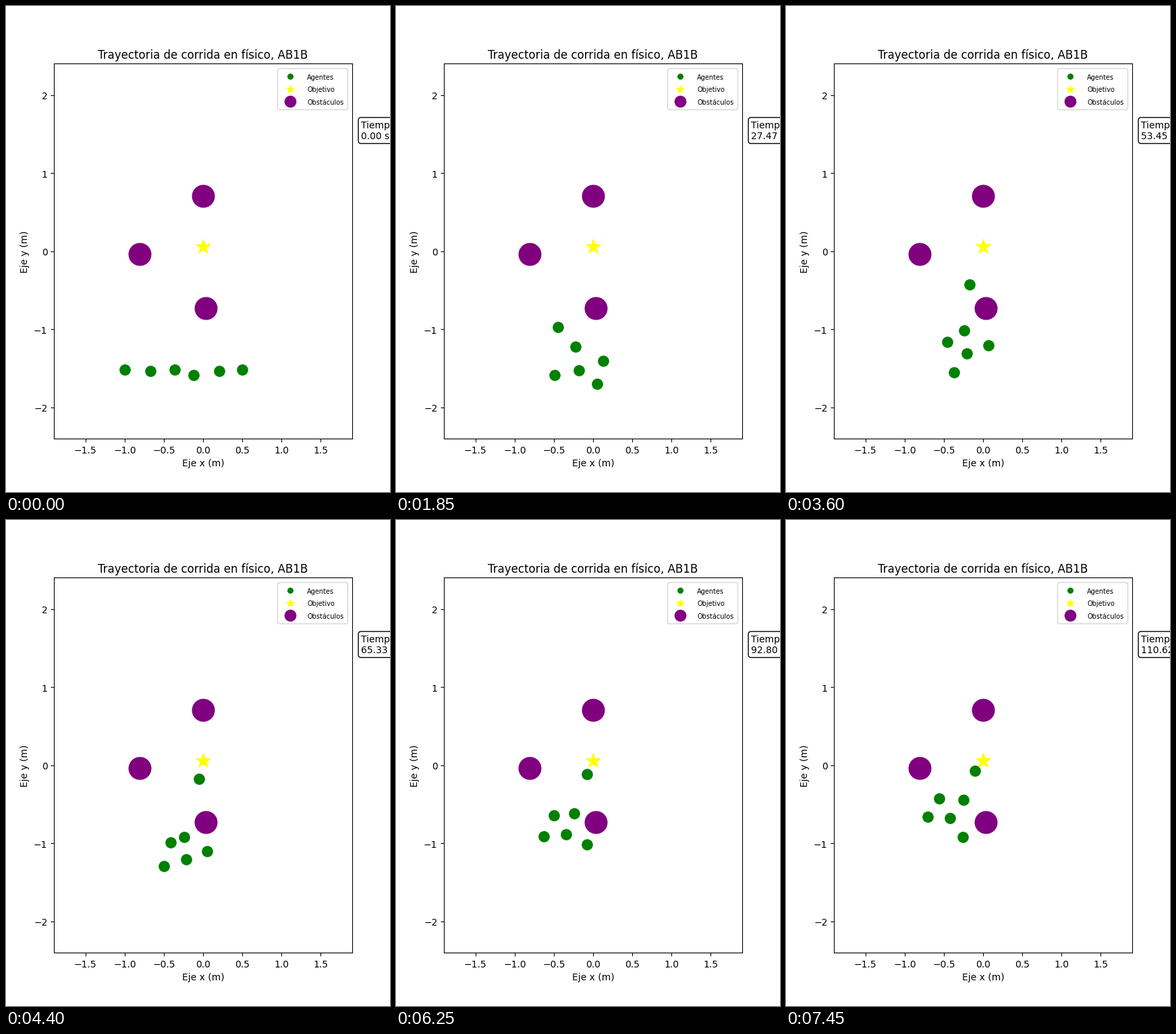
These frames come from a looping animation (569 px wide and 719 px high, 7.5 s). A matplotlib script:

```python
import numpy as np
import matplotlib.pyplot as plt
from matplotlib.animation import FuncAnimation

FRAMES, STEP_MS = 150, 50
SECONDS_PER_FRAME = 0.7424
RING, GATHER = 0.29, 14  # final ring radius (m), closing time (frames)

# Shared key times; the leader and the swarm centre move between key points (m)
KEYS = [0, 37, 88, 149]
LEADER = [(-0.67, -1.54), (-0.45, -0.97), (-0.05, -0.18), (-0.10, -0.07)]
CENTRE = [(-0.36, -1.52), (-0.18, -1.53), (-0.22, -1.21), (-0.42, -0.68)]
# Agents circling the centre: initial distance (m), bearings at the key times
ORBITS = [
    (0.64, (180, 191, 131, 118)),
    (0.25, (-16, -36, -164, -183)),
    (0.57, (-2, 99, 95, 54)),
    (0.86, (0, 22, 21, -56)),
]


def along(points, i):
    return np.array([np.interp(i, KEYS, axis) for axis in zip(*points)])


def orbit(start, bearings, i):
    radius = RING + (start - RING) * np.exp(-i / GATHER)
    angle = np.radians(np.interp(i, KEYS, bearings))
    return radius * np.array([np.cos(angle), np.sin(angle)])


def positions(i):
    centre = along(CENTRE, i)
    ring = [centre + orbit(start, bearings, i) for start, bearings in ORBITS]
    return np.array([along(LEADER, i), centre, *ring])


plt.rcParams["font.family"] = "DejaVu Sans"
# The canvas is truncated to whole pixels: 569 x 719
fig, ax = plt.subplots(figsize=(5.6999, 7.1999), dpi=100)


def dots(points, shape, color, size, label):
    x, y = np.transpose(points)
    return ax.scatter(x, y, s=size, marker=shape, color=color, label=label)


agents = dots(positions(0), "o", "green", 120, "Agentes")
dots([(0, 0.06)], "*", "yellow", 250, "Objetivo")
dots([(0, 0.71), (-0.81, -0.04), (0.03, -0.73)], "o", "purple", 550, "Obstáculos")

ax.set(xlim=(-1.9, 1.9), ylim=(-2.4, 2.4),
       xticks=np.arange(-1.5, 1.6, 0.5), yticks=range(-2, 3),
       xlabel="Eje x (m)", ylabel="Eje y (m)",
       title="Trayectoria de corrida en físico, AB1B")

legend = ax.legend(loc="upper right", markerscale=0.5)
plt.setp(legend.get_texts(), fontsize=7)

clock = ax.text(1.03, 0.8, "", transform=ax.transAxes, fontsize=10,
                bbox=dict(boxstyle="round", facecolor="white"))


def update(i):
    agents.set_offsets(positions(i))
    clock.set_text(f"Tiempo:\n{i * SECONDS_PER_FRAME:.2f} s")
    return agents, clock


anim = FuncAnimation(fig, update, frames=FRAMES, interval=STEP_MS,
                     init_func=lambda: update(0), repeat=True, repeat_delay=0)
plt.show()
```
